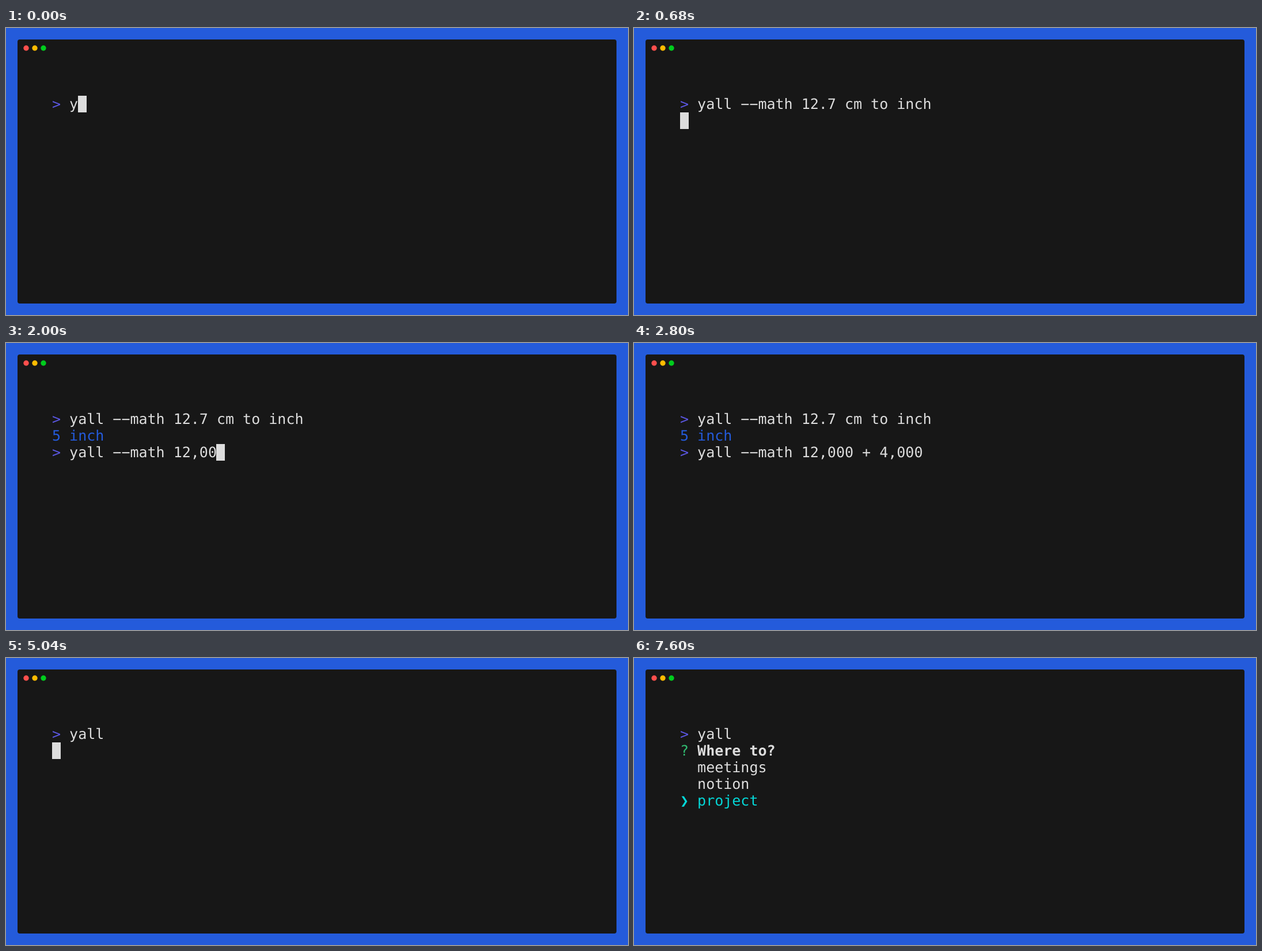
Recreate the animation shown at these times as an HTML page. Size 1080x500 px, loop 8 s.

```html
<!DOCTYPE html>
<html lang="en">
<head>
<meta charset="utf-8">
<title>Terminal demo</title>
<style>
  html, body { margin: 0; width: 100%; height: 100%; overflow: hidden; background: #245bdb; }
  svg { display: block; width: 100%; height: 100%; }
  text {
    font: 25px "DejaVu Sans Mono", monospace;
    white-space: pre;
    text-rendering: geometricPrecision;
  }
</style>
</head>
<body>
<svg viewBox="0 0 1080 500">
  <rect width="1080" height="500" fill="#245bdb"/>
  <rect x="20" y="20" width="1040" height="460" rx="4" fill="#171717"/>
  <circle cx="35" cy="35" r="4.7" fill="#ff4f4d"/>
  <circle cx="50" cy="35" r="4.7" fill="#febb00"/>
  <circle cx="65" cy="35" r="4.7" fill="#00cc1d"/>
  <g id="screen"></g>
  <rect id="cursor" width="15" height="29" fill="#dddddd"/>
</svg>
<script>
const LOOP = 8000;
const LEFT = 80, TOP = 118, CELL = 15.05, ROW = 29, ASCENT = 23;
const COLOR = {
  text: '#dddddd', prompt: '#5a56e0', result: '#245bdb',
  green: '#31bb71', cyan: '#04d7d7', dim: '#7a7a7a'
};
const FIRST = 'yall --math 12.7 cm to inch';
const SECOND = 'yall --math 12,000 + 4,000';
const OPTIONS = ['meetings', 'notion', 'project'];

const screen = document.getElementById('screen');
const cursor = document.getElementById('cursor');

// A run of text: starting column, content, colour, weight.
const run = (col, text, color = COLOR.text, weight = 400) => ({ col, text, color, weight });
const prompt = (command = '') => [run(0, '>', COLOR.prompt), run(2, command)];
const result = text => [run(0, text, COLOR.result)];
const frame = (rows, at = null) => ({ rows, at });

function typing(above, command) {
  return frame([...above, prompt(command)], [command.length + 2, above.length]);
}

// Waits on the next row, hides the cursor, prints the result, then prompts again.
function answer(above, text, t, hideAt, printAt, promptAt) {
  if (t < hideAt) return frame(above, [0, above.length]);
  if (t < printAt) return frame(above);
  const rows = [...above, result(text)];
  return t < promptAt ? frame(rows) : typing(rows, '');
}

function menu(selected, hint, cursorOn) {
  const question = [run(0, '?', COLOR.green), run(2, 'Where to?', COLOR.text, 700)];
  if (hint) question.push(run(12, hint, COLOR.dim));
  const items = OPTIONS.map((name, i) => i === selected
    ? [run(0, '❯', COLOR.cyan), run(2, name, COLOR.cyan)]
    : [run(2, name)]);
  return frame([prompt('yall'), question, ...items], cursorOn ? [12 + hint.length, 1] : null);
}

function stateAt(t) {
  const one = [prompt(FIRST)];
  const two = [...one, result('5 inch'), prompt(SECOND)];

  if (t < 680) return typing([], FIRST.slice(0, t < 80 ? 1 : Math.floor(1.5 + t / 25)));
  if (t < 1640) return answer(one, '5 inch', t, 1240, 1360, 1360);
  if (t < 2240) return typing(two.slice(0, 2), SECOND.slice(0, Math.floor(1.9 + (t - 1640) / 23)));
  if (t < 3120) return answer(two, '16000', t, 2800, 2880, 2920);
  if (t < 5040) return typing([], 'yall'.slice(0, 1 + Math.floor((t - 3120) / 480)));
  if (t < 5720) return frame([prompt('yall')], t < 5640 ? [0, 1] : null);
  if (t < 6520) return menu(0, '(Use arrow keys or type to search)', t < 6320);
  return menu(t < 7000 ? 1 : 2, '', t < 7600);
}

function textNode({ col, text, color, weight }, row) {
  const node = document.createElementNS('http://www.w3.org/2000/svg', 'text');
  node.setAttribute('x', LEFT + col * CELL);
  node.setAttribute('y', TOP + row * ROW + ASCENT);
  node.setAttribute('fill', color);
  node.style.fontWeight = weight;
  // The terminal face has wide hyphens, closer to a minus sign.
  node.textContent = text.replace(/-/g, '\u2212');
  return node;
}

let shown = '';
function draw(t) {
  const state = stateAt(t);
  const key = JSON.stringify(state);
  if (key === shown) return;
  shown = key;
  screen.replaceChildren(...state.rows.flatMap((runs, row) => runs.map(r => textNode(r, row))));
  cursor.style.display = state.at ? '' : 'none';
  if (state.at) {
    cursor.setAttribute('x', Math.floor(LEFT + state.at[0] * CELL));
    cursor.setAttribute('y', TOP + state.at[1] * ROW);
  }
}

const start = performance.now();
function tick() {
  draw((performance.now() - start) % LOOP);
  requestAnimationFrame(tick);
}
tick();
</script>
</body>
</html>
```
